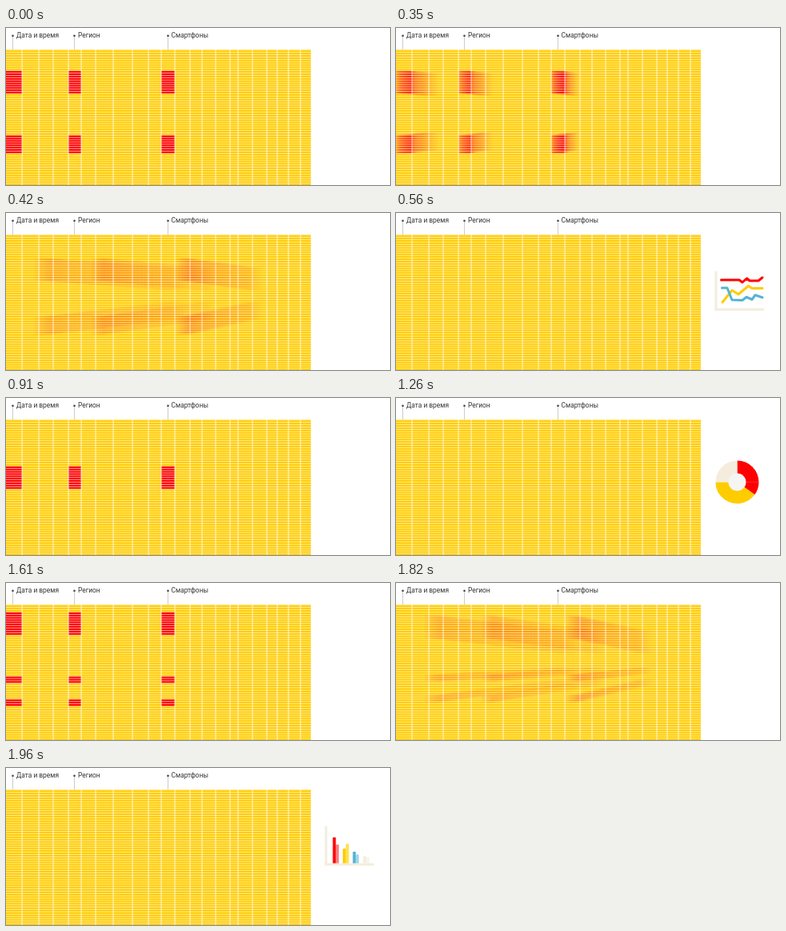
An HTML page with a canvas for the animation above (2.24 s loop, 480 by 197 pixels).

```html
<!DOCTYPE html>
<html lang="ru">
<head>
<meta charset="utf-8">
<title>Данные и графики</title>
<style>
html, body { margin: 0; width: 100%; height: 100%; overflow: hidden; background: #fff; }
canvas, svg { position: absolute; left: 0; top: 0; display: block; }
text { font: 8.4px Roboto, "Open Sans", sans-serif; fill: #333; }
</style>
</head>
<body>
<canvas id="stage" width="480" height="197"></canvas>
<svg width="480" height="197" viewBox="0 0 480 197">
  <text x="13" y="12">Дата и время</text>
  <text x="90" y="12">Регион</text>
  <text x="206.5" y="12">Смартфоны</text>
</svg>
<script>
const ctx = document.getElementById('stage').getContext('2d');
const layer = document.createElement('canvas');
layer.width = 480;
layer.height = 197;
const blur = layer.getContext('2d');

const RED = '#ff0000', YELLOW = '#ffcc00', BLUE = '#55b4d6', BEIGE = '#f4eddd';
const LOOP = 2240, STEP = 70, STEPS = 4, SAMPLES = 51;
const GRID = { top: 27, right: 381, bottom: 197, row0: 27.8, row: 2.88 };
const COLS = [20, 41, 59, 78, 94, 112, 134, 158, 178, 194, 211, 230,
              245, 262, 280, 290, 308, 326, 339, 353, 368];
const PINS = [8.5, 85.5, 202.5];
const FIELDS = [[0, 20], [78, 94], [194, 211]];
const FOCUS = { x: 430, y: 98 };
const CHART_ALPHA = [0, 0, 0, 0.5, 1];

// rows: [first row, row count]; go: moment the selection starts to fly
const SCENES = [
  { start: 0, go: 350, rows: [[9, 10], [37, 8]], chart: drawLines },
  { start: 910, go: 1050, rows: [[20, 10]], chart: drawDonut },
  { start: 1610, go: 1750, rows: [[3, 10], [31, 3], [41, 3]], chart: drawBars }
];

const easeIn = u => 0.5 * Math.pow(2 * u, 2.6);
const ease = u => u < 0.5 ? easeIn(u) : 1 - easeIn(1 - u);

function rect(x, y, w, h, color) {
  ctx.fillStyle = color;
  ctx.fillRect(x, y, w, h);
}

function path(points, color, width) {
  ctx.beginPath();
  points.forEach(([x, y]) => ctx.lineTo(x, y));
  ctx.strokeStyle = color;
  ctx.lineWidth = width;
  ctx.lineCap = ctx.lineJoin = 'round';
  ctx.stroke();
}

function disc(x, y, r, color, from = 0, to = 360) {
  const rad = Math.PI / 180;
  ctx.beginPath();
  if (to - from < 360) ctx.moveTo(x, y);
  ctx.arc(x, y, r, from * rad, to * rad);
  ctx.fillStyle = color;
  ctx.fill();
}

// Blocks shifted by the given share of their way to the chart
function drawBlocks(target, rows, part) {
  for (const [first, count] of rows) {
    const y = GRID.row0 + first * GRID.row, h = count * GRID.row;
    const dy = (FOCUS.y - y - h / 2) * part;
    for (const [left, right] of FIELDS) {
      const dx = (FOCUS.x - right) * part;
      target.fillRect(left + dx, y + dy, right - left, h);
    }
  }
}

// Motion blur over one step: the even mean of many positions
function drawFlight(rows, step) {
  blur.clearRect(0, 0, 480, 197);
  blur.globalCompositeOperation = 'lighter';
  blur.fillStyle = `rgba(255,0,0,${1 / SAMPLES})`;
  for (let i = 0; i < SAMPLES; i++)
    drawBlocks(blur, rows, ease((step - 1 + (i + 0.5) / SAMPLES) / STEPS));
  ctx.drawImage(layer, 0, 0);
}

function drawGridLines() {
  for (let y = GRID.row0; y < GRID.bottom; y += GRID.row)
    rect(0, y - 0.35, GRID.right, 0.7, 'rgba(255,255,255,0.85)');
  for (const x of COLS)
    rect(x - 0.5, GRID.top, 1.1, GRID.bottom - GRID.top, 'rgba(255,255,255,0.75)');
}

function drawPins() {
  for (const x of PINS) {
    rect(x - 0.5, 10, 1, 17, '#cccccc');
    disc(x, 9.7, 1.3, '#444');
  }
}

function drawAxes() {
  rect(398.5, 73, 3, 49.5, BEIGE);
  rect(398.5, 119.5, 61.5, 3, BEIGE);
}

function drawLines() {
  drawAxes();
  path([[408, 112], [420, 97], [428, 102], [440.5, 91.5], [445, 94.5], [458, 94.5]], YELLOW, 3);
  path([[407.5, 94], [414, 94], [420, 109], [433, 109.5], [438, 105.5],
        [445, 108.5], [449, 103], [458, 106]], BLUE, 3);
  path([[406.5, 84], [429, 84], [433, 87], [438.5, 82], [442, 85], [453, 85], [458, 81]], RED, 3);
}

function drawDonut() {
  const x = 426.5, y = 105.5;
  disc(x, y, 27, RED, -90, 36);
  disc(x, y, 27, YELLOW, 36, 180);
  disc(x, y, 27, BEIGE, 180, 270);
  rect(x, y - 0.5, 27, 0.6, 'rgba(255,255,255,0.25)');
  disc(x, y, 11, '#f5f5f3');
}

function drawBar(x, top, color) {
  ctx.beginPath();
  ctx.roundRect(x, top, 3.8, 119.5 - top, [1.2, 1.2, 0, 0]);
  ctx.fillStyle = color;
  ctx.fill();
}

function drawBars() {
  drawAxes();
  const pairs = [
    [408.5, RED, 87, '#ff7f7f', 96],
    [421, YELLOW, 101, '#ffe24d', 95],
    [433.5, BLUE, 105, '#a0d8ea', 108.5],
    [446.5, BEIGE, 110.5, '#f8f4ea', 112]
  ];
  for (const [x, dark, top1, pale, top2] of pairs) {
    drawBar(x + 3.8, top2, pale);
    drawBar(x, top1, dark);
  }
}

function draw(now) {
  const t = now % LOOP;
  const scene = SCENES.filter(s => t >= s.start).pop();
  const step = Math.max(0, Math.min(STEPS, Math.floor((t - scene.go) / STEP) + 1));

  rect(0, 0, 480, 197, '#fff');
  drawPins();
  rect(0, GRID.top, GRID.right, GRID.bottom - GRID.top, YELLOW);
  if (step === 0) {
    ctx.fillStyle = RED;
    drawBlocks(ctx, scene.rows, 0);
  } else if (step < STEPS) {
    drawFlight(scene.rows, step);
  }
  drawGridLines();
  ctx.globalAlpha = CHART_ALPHA[step];
  scene.chart();
  ctx.globalAlpha = 1;
}

const begin = performance.now();
function tick() {
  draw(performance.now() - begin);
  requestAnimationFrame(tick);
}
tick();
</script>
</body>
</html>
```
